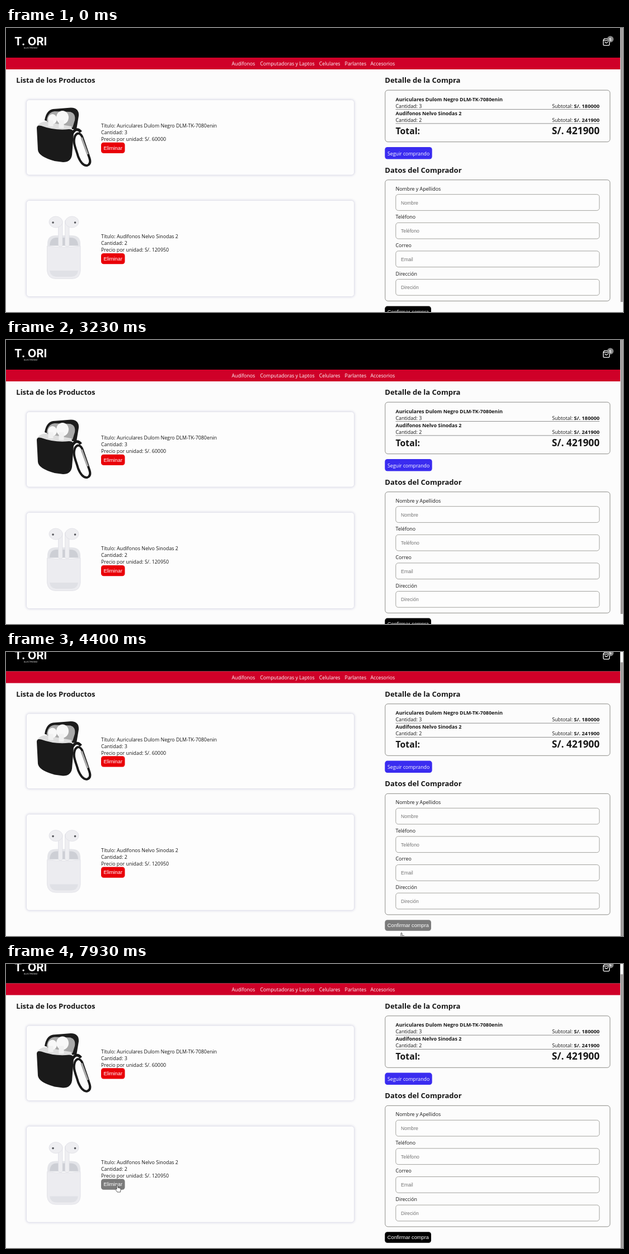
Animation of 1103 by 508 pixels, one loop 8000 ms. Source, as an HTML page:

```html
<!DOCTYPE html>
<html lang="es">
<head>
<meta charset="utf-8">
<title>Carrito</title>
<style>
  html, body { margin: 0; width: 100%; height: 100%; overflow: hidden; background: #fcfcfc; }
  svg { display: block; }
  text { font: 8.85px "Open Sans", sans-serif; fill: #161616; white-space: pre; }
  .nav { font-size: 8.8px; fill: #fff; }
  .title { font-size: 13px; font-weight: 700; }
  .bold { font-size: 8.95px; font-weight: 700; }
  .price { font-size: 9.25px; font-weight: 700; }
  .total { font-size: 15.8px; font-weight: 700; }
  .sum { font-size: 17.3px; font-weight: 700; }
  .end { text-anchor: end; }
  .link { font-size: 8.75px; fill: #fff; }
  .button { font: 9.28px "Liberation Sans", Arial, sans-serif; fill: #fff; }
  .hint { font: 8.7px "Liberation Sans", Arial, sans-serif; fill: #757575; }
  .brand { font: 700 20.2px Inter, sans-serif; fill: #fff; }
  .tagline { font: italic 3.9px Inter, sans-serif; fill: #ddd; }
  .badge { font-size: 7.5px; font-weight: 700; fill: #fff; text-anchor: middle; }
  .card { fill: #fdfdfd; stroke: #e3e3ec; filter: drop-shadow(0 0 2px #d5d5e4); }
  .panel { fill: none; stroke: #8c8c88; }
  .field { fill: #fdfdfd; stroke: #a3a39e; }
</style>
</head>
<body>
<svg id="stage" width="1103" height="508" viewBox="0 0 1103 508">
  <g id="page"></g>
  <rect x="1098" width="5" height="508" fill="#f8f8f8"/>
  <rect id="thumb" x="1098.7" width="4" height="490" fill="#9c9797"/>
  <g id="pointer" stroke="#333" stroke-width=".8" stroke-linejoin="round" fill="#fff">
    <path id="arrow" d="M0 0V9.4L2.2 7.4L3.7 10.6L5 10L3.6 7H6.4Z"/>
    <path id="hand" d="M-1 1Q0-.6 1 1V5L5 6Q6.5 6.5 6.3 8L5.4 13H0L-3.4 8.4Q-3.2 6.6-1 8Z"/>
  </g>
</svg>
<script>
const LOOP = 8000, SCROLL = 18.4;
const byId = id => document.getElementById(id);
const text = (x, y, value, cls = "") => `<text x="${x}" y="${y}" class="${cls}">${value}</text>`;
const rect = (x, y, w, h, r, attrs) => `<rect x="${x}" y="${y}" width="${w}" height="${h}" rx="${r}" ${attrs}/>`;
const path = (d, attrs) => `<path d="${d}" ${attrs}/>`;

const products = [
  { name: "Auriculares Dulom Negro DLM-TK-7080enin", count: 3, unit: 60000, card: [128.5, 134.5], top: 178, row: 130.6 },
  { name: "Audífonos Nelvo Sinodas 2", count: 2, unit: 120950, card: [308.5, 172], top: 376.2, row: 155.9 },
];

const buttons = [
  { id: "remove0", x: 170, y: 204.7, w: 42.5, h: 19.3, color: "#e90008", label: "Eliminar" },
  { id: "remove1", x: 170, y: 402.9, w: 42.5, h: 19.3, color: "#e90008", label: "Eliminar" },
  { id: "confirm", x: 677.3, y: 497.6, w: 82.7, h: 19.6, color: "#000", label: "Confirmar compra" },
];

const header = () =>
  rect(0, 0, 1098, 53, 0, 'fill="#000"') +
  rect(0, 53, 1098, 21, 0, 'fill="#cf0028"') +
  text(15, 31, "T. ORI", "brand") + text(32, 37.3, "ELECTRONIC", "tagline") +
  [[403.5, "Audífonos"], [454.2, "Computadoras y Laptos"], [559.8, "Celulares"], [605.6, "Parlantes"], [651.5, "Accesorios"]]
    .map(([x, label]) => text(x, 67.2, label, "nav")).join("") +
  path("M1069.6 19.2L1067.8 21.8V29.5Q1067.8 31.2 1069.5 31.2H1077Q1078.7 31.2 1078.7 29.5V21.8L1076.9 19.2ZM1067.8 22.2H1078.7M1070.5 24.5Q1073.2 29 1076 24.5",
    'fill="none" stroke="#fff" stroke-width="1.3" stroke-linejoin="round"') +
  '<circle cx="1080.4" cy="20" r="5.8" fill="#858585"/>' + text(1080.4, 22.8, "5", "badge");

const blackCase = () =>
  path("M69 165Q72 147 84 145L116 142.5Q131 143 130 157L126 181L112 181Z", 'fill="#1c1c1c"') +
  path("M73 163Q76 150 87 149L115 150Q125 153 123 165L119 178L73 170Z", 'fill="#a9a9a9"') +
  path("M56 175Q64 164 78 169L117 176L119 184Q85 186 56 177Z", 'fill="#dedede"') +
  '<g fill="#f8f8f8"><ellipse cx="83" cy="163" rx="8" ry="9"/><ellipse cx="101" cy="160" rx="11" ry="12"/></g>' +
  path("M80 165V176M99 165V179", 'stroke="#f1f1f1" stroke-width="9"') +
  path("M55 179Q55 173 63 175Q88 184 113 181Q121 181 121 188L118 227Q116 240 102 240L87 238Q58 230 57 218Z", 'fill="#1a1a1a"') +
  path("M118 189Q126 176 134 186", 'fill="none" stroke="#171717" stroke-width="5"') +
  path("M124 192C118 204 125 215 129 230Q136 247 145 246Q153 243 149 232L136 194Q130 184 124 192Z", 'fill="none" stroke="#1b1b1b" stroke-width="4"') +
  path("M135 196L146 226", 'stroke="#a8a8a8" stroke-width="3.6"');

const whiteCase = () =>
  path("M74 390V384Q75 371 89 371H117Q132 371 133 384V390Z", 'fill="#e4e5e9"') +
  path("M78 389Q79 375 90 375H116Q128 375 129 389Z", 'fill="#cdcfd5"') +
  '<g fill="#eeeef1" stroke="#dcdce2" stroke-width=".7">' +
  rect(93.5, 343, 7.5, 48, 3, "") + rect(105.5, 343, 7.5, 48, 3, "") +
  '<ellipse cx="89" cy="347" rx="12" ry="10"/><ellipse cx="118" cy="347" rx="12" ry="10"/></g>' +
  '<g fill="#55565b"><circle cx="84" cy="348" r="1.8"/><circle cx="123.500" cy="348" r="1.8"/></g>' +
  path("M73.500 390Q103 394 133 390V434Q132 448.500 118 448.500H89Q75 448.500 73.500 434Z", 'fill="#ececf0" stroke="#dfdfe5" stroke-width=".8"') +
  path("M78 434Q80 445 90 445H117Q127 445 129 434Z", 'fill="#e0e1e6"');

const productCard = ({ name, count, unit, card: [y, h], top }) =>
  rect(36.5, y, 586, h, 5, 'class="card"') +
  [`Título: ${name}`, `Cantidad: ${count}`, `Precio por unidad: S/. ${unit}`]
    .map((line, i) => text(170, top + i * 12.1, line)).join("");

const summaryRow = ({ name, count, unit, row }) =>
  text(696.5, row, name, "bold") + text(696.5, row + 12, `Cantidad: ${count}`) +
  text(1061, row + 12, `Subtotal: <tspan class="price">S/. ${count * unit}</tspan>`, "end") +
  rect(696.5, row + 14.6, 364.5, 0.8, 0, 'fill="#777"');

const formField = ([label, hint], i) => {
  const y = 290.7 + i * 50.6;
  return text(696.5, y, label) + rect(696.8, y + 7, 364, 28.7, 4.5, 'class="field"') + text(706, y + 24.8, hint, "hint");
};

const button = ({ id, x, y, w, h, color, label }) =>
  rect(x, y, w, h, 4.5, `id="${id}" fill="${color}"`) + text(x + 4.5, y + 12.9, label, "button");

byId("page").innerHTML = header() +
  text(18.3, 98, "Lista de los Productos", "title") +
  products.map(productCard).join("") + blackCase() + whiteCase() +
  text(677.3, 98, "Detalle de la Compra", "title") +
  rect(677.8, 111.2, 402, 92.5, 5, 'class="panel"') +
  products.map(summaryRow).join("") +
  text(696.5, 189.6, "Total:", "total") + text(1061, 189.6, "S/. 421900", "sum end") +
  rect(677.3, 213, 84.4, 21.5, 4.5, 'fill="#3a2cf0"') + text(682, 227.6, "Seguir comprando", "link") +
  text(677.3, 258.5, "Datos del Comprador", "title") +
  rect(677.8, 271.7, 402, 216.6, 5, 'class="panel"') +
  [["Nombre y Apellidos", "Nombre"], ["Teléfono", "Teléfono"], ["Correo", "Email"], ["Dirección", "Direción"]].map(formField).join("") +
  buttons.map(button).join("");

// Pointer route: time, x, y. Points beyond the stage keep it out of sight.
const route = [
  [0, 420, 525], [1300, 420, 525], [1770, 378.5, 179.5], [2000, 330, 186], [2270, 330, 186],
  [3080, 760, 525], [3600, 960, 525], [3830, 813, 263], [4400, 707, 502], [4600, 716, 490],
  [4830, 716, 490], [5630, 1069, 178], [5670, 1069, 178], [5770, 900, 200], [5870, 730, 110],
  [6030, 730, 110], [6830, 618, 165], [6870, 618, 165], [7030, 297, 328], [7230, 297, 328],
  [7900, 199, 395], [LOOP, 199, 395],
];

const ease = p => { p = Math.min(1, Math.max(0, p)); return p * p * (3 - 2 * p); };

function pointerAt(time) {
  const next = route.findIndex(([t]) => t > time);
  const [t0, x0, y0] = route[next - 1], [t1, x1, y1] = route[next];
  const p = ease((time - t0) / (t1 - t0));
  return [x0 + (x1 - x0) * p, y0 + (y1 - y0) * p];
}

function draw() {
  const time = performance.now() % LOOP;
  const scroll = SCROLL * ease((time - 3806) / 160);
  const [x, y] = pointerAt(time);
  byId("page").setAttribute("transform", `translate(0 ${-scroll})`);
  byId("thumb").setAttribute("y", scroll);
  byId("pointer").setAttribute("transform", `translate(${x} ${y})`);

  let hovering = false;
  for (const b of buttons) {
    const top = b.y - scroll;
    const over = x > b.x && x < b.x + b.w && y > top && y < Math.min(top + b.h + 4, 508);
    byId(b.id).setAttribute("fill", over ? "#7b7b7b" : b.color);
    hovering ||= over;
  }
  byId("arrow").style.display = hovering ? "none" : "";
  byId("hand").style.display = hovering ? "" : "none";
  requestAnimationFrame(draw);
}
draw();
</script>
</body>
</html>
```
